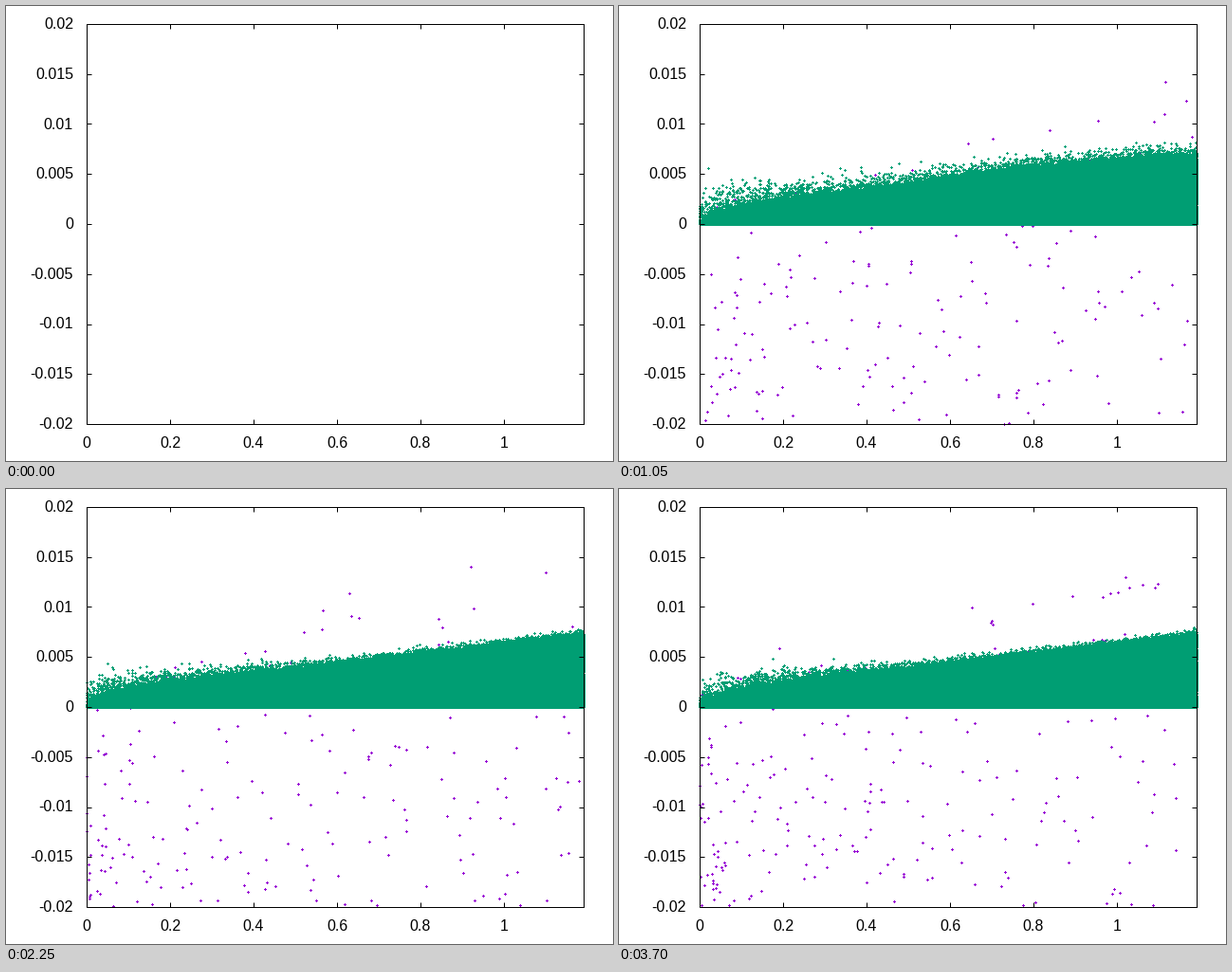
A matplotlib script that plays this animation: 640x480 px, repeating every 3750 ms.

```python
import numpy as np
import matplotlib.pyplot as plt
from matplotlib.animation import FuncAnimation
from matplotlib.markers import MarkerStyle

W, H, DPI = 640, 480, 100
PX = 72 / DPI  # one pixel in points
LEFT, RIGHT, TOP, BOTTOM = 85, 609, 19, 441
X_SCALE = 440  # pixels per unit of x
X_MAX = (RIGHT - LEFT) / X_SCALE
Y_MAX = 0.02
FRAMES, STEP = 75, 50
GREEN, PURPLE = "#009e73", "#9400d3"

fig = plt.figure(figsize=(W / DPI, H / DPI), dpi=DPI, facecolor="white")
ax = fig.add_axes([LEFT / W, 1 - BOTTOM / H, (RIGHT - LEFT) / W, (BOTTOM - TOP) / H])
ax.set(xlim=(0, X_MAX), ylim=(-Y_MAX, Y_MAX))
ax.set_axisbelow(False)
for spine in ax.spines.values():
    spine.set_linewidth(PX)

x_ticks = np.arange(6) * 0.2
y_ticks = np.linspace(-Y_MAX, Y_MAX, 9)
ax.set_xticks(x_ticks)
ax.set_yticks(y_ticks)
ax.tick_params(direction="in", top=True, right=True, length=5 * PX, width=PX,
               labelbottom=False, labelleft=False)


def label(px, py, value, align):
    fig.text(px / W, 1 - py / H, f"{round(value, 3) + 0.0:g}", ha=align,
             va="baseline", family="Liberation Sans", size=16 * PX)


for v in x_ticks:
    label(LEFT + v * X_SCALE, 466, v, "center")
for v in y_ticks:
    label(71, (TOP + BOTTOM) / 2 - v / Y_MAX * (BOTTOM - TOP) / 2 + 5, v, "right")


def dots(color, zorder):
    plus = MarkerStyle("+", capstyle="projecting")
    return ax.plot([], [], ls="none", marker=plus, ms=2 * PX, mew=PX, color=color,
                   antialiased=False, clip_on=False, zorder=zorder)[0]


drops = dots(PURPLE, 1)
film = ax.fill([0, 0, 0], [0, 0, 0], color=GREEN, lw=0, antialiased=False,
               clip_on=False, zorder=1.1)[0]
fringe = dots(GREEN, 1.2)


def depth(x, n):
    """Film depth: a steady profile, limited by the even rise at the start."""
    steady = 0.0003 + 0.0014 * (1 - np.exp(-x / 0.06)) + 0.0041 * x + 0.0005 * x**2
    wave = 0.0005 * np.exp(-(((x - 0.0375 * n + 0.04) / 0.2) ** 2))
    return np.minimum(steady + wave, 0.00031 * n + 0.0003 * x)


def film_points(rng, n):
    x = rng.uniform(0, X_MAX, 3000)
    edge = depth(x, n) + rng.exponential(0.00012, x.size) - 0.0001
    # Loose spray over the edge: widest near x = 0 and while the film rises
    far = X_MAX * rng.random(1600) ** 1.25
    early = 0.0006 * np.exp(-((n / 25) ** 2))
    spread = 0.0002 + early + 0.0007 * np.exp(-far / 0.35)
    tail = depth(far, n) + np.abs(rng.normal(0, spread * min(1, n / 12)))
    floor = rng.uniform(0, X_MAX, 1000)
    side = np.concatenate([np.zeros(40), np.full(250, X_MAX)])
    side_y = rng.uniform(0, 1, side.size) * depth(side, n)
    return (np.concatenate([x, far, floor, side]),
            np.concatenate([np.maximum(edge, 0), tail, 0 * floor, side_y]))


def drop_points(rng, n):
    late = n / FRAMES
    count = int(140 + 50 * late)
    low_x = X_MAX * rng.random(count) ** (1.4 + 0.5 * late)
    low_y = -Y_MAX * rng.random(count) ** 0.85
    high_x = rng.uniform(0.35 + 0.25 * late, X_MAX - 0.02, int(7 + 8 * late))
    high_y = 0.0028 + (0.0078 + 0.0012 * late) * high_x
    high_y = high_y + rng.normal(0, 0.0011, high_x.size)
    near_x = rng.uniform(0, X_MAX, 25)
    near_y = depth(near_x, n) + rng.exponential(0.0005, near_x.size)
    return (np.concatenate([low_x, high_x, near_x]),
            np.concatenate([low_y, high_y, near_y]))


grid = np.linspace(0, X_MAX + 1 / X_SCALE, 527)


def draw(n):
    artists = (drops, film, fringe)
    for artist in artists:
        artist.set_visible(n > 0)
    if n > 0:
        rng = np.random.default_rng(n)
        top = np.column_stack([grid, depth(grid, n)])
        film.set_xy(np.vstack([[0, -0.0001], top, [grid[-1], -0.0001]]))
        fringe.set_data(*film_points(rng, n))
        drops.set_data(*drop_points(rng, n))
    return artists


anim = FuncAnimation(fig, draw, frames=FRAMES, interval=STEP, repeat=True,
                     repeat_delay=0, init_func=lambda: draw(0))
plt.show()
```
